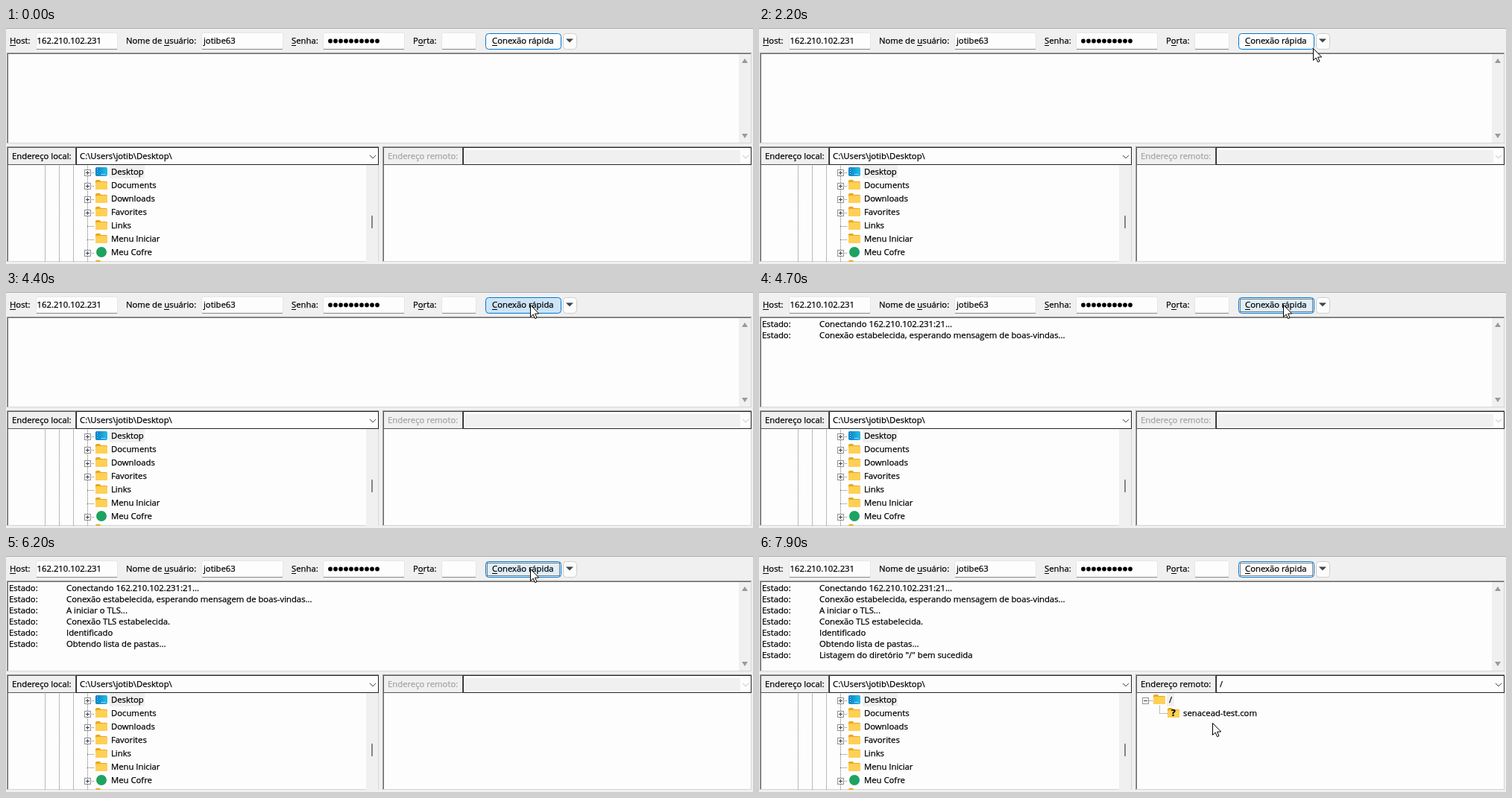
Recreate the animation shown at these times as an HTML page with a canvas. Size 1002 px wide and 317 px high, loop 8 s.

```html
<!DOCTYPE html>
<html lang="pt">
<head>
<meta charset="utf-8">
<style>
html, body { margin: 0; width: 1002px; height: 317px; overflow: hidden; }
canvas { display: block; }
</style>
</head>
<body>
<canvas id="stage" width="1002" height="317"></canvas>
<script>
const ctx = document.getElementById('stage').getContext('2d', { alpha: false });
const LOOP = 8000;
const FACE = '#f0f0f0', PAPER = '#fdfdfd', DARK = '#555', INK = '#000', BLUE = '#0078d4';

// [time, x, y]; an entry without a place hides the pointer
const pointer = [
  [0], [200, 34, 16], [300, 28, 9], [400, 22, -6], [500],
  [2200, 743, 27], [2300, 732, 21], [2400, 723, 17],
  [2600, 720, 17], [2700, 715, 17], [2800, 710, 17], [2900, 706, 17], [3000, 703, 17],
  [7200, 688, 34], [7300], [7600, 625, 154], [7800, 615, 195], [7900, 608, 224]
];

const log = [
  [4600, 'Conectando 162.210.102.231:21...'],
  [4700, 'Conexão estabelecida, esperando mensagem de boas-vindas...'],
  [5000, 'A iniciar o TLS...'],
  [5300, 'Conexão TLS estabelecida.'],
  [6200, 'Identificado'],
  [6200, 'Obtendo lista de pastas...'],
  [6300, 'Listagem do diretório "/" bem sucedida']
];

const localTree = ['Desktop', 'Documents', 'Downloads', 'Favorites', 'Links', 'Menu Iniciar', 'Meu Cofre', ''];

function rect(x, y, w, h, color) {
  ctx.fillStyle = color;
  ctx.fillRect(x, y, w, h);
}

function frame(x, y, w, h, color) {
  ctx.strokeStyle = color;
  ctx.strokeRect(x + .5, y + .5, w - 1, h - 1);
}

function rounded(x, y, w, h, r, fill, stroke) {
  ctx.beginPath();
  ctx.roundRect(x + .5, y + .5, w - 1, h - 1, r);
  ctx.fillStyle = fill;
  ctx.fill();
  ctx.strokeStyle = stroke || fill;
  ctx.stroke();
}

function polygon(points, fill, stroke) {
  ctx.beginPath();
  points.forEach(([x, y]) => ctx.lineTo(x, y));
  ctx.closePath();
  ctx.fillStyle = fill;
  ctx.fill();
  if (stroke) {
    ctx.strokeStyle = stroke;
    ctx.stroke();
  }
}

function disc(x, y, r, color) {
  ctx.fillStyle = color;
  ctx.beginPath();
  ctx.arc(x, y, r, 0, 7);
  ctx.fill();
}

// A hairline stroke gives the type its slightly heavier weight
function text(s, x, y, color = INK) {
  ctx.fillStyle = ctx.strokeStyle = color;
  ctx.fillText(s, x, y);
  ctx.lineWidth = .25;
  ctx.strokeText(s, x, y);
  ctx.lineWidth = 1;
}

// Label with one underlined access key
function keyLabel(s, key, x, y) {
  text(s, x, y);
  const start = x + ctx.measureText(s.slice(0, key)).width;
  rect(Math.round(start), y + 2, Math.round(ctx.measureText(s[key]).width), 1, INK);
}

function dots(x1, y1, x2, y2) {
  const n = Math.max(x2 - x1, y2 - y1);
  for (let i = 0; i <= n; i += 2) {
    rect(x1 + (x2 > x1 ? i : 0), y1 + (y2 > y1 ? i : 0), 1, 1, '#777');
  }
}

function chevron(x, y, color) {
  ctx.strokeStyle = color;
  ctx.beginPath();
  ctx.moveTo(x - 4, y - 2);
  ctx.lineTo(x, y + 2);
  ctx.lineTo(x + 4, y - 2);
  ctx.stroke();
}

function field(x, w) {
  rounded(x, 6, w, 23, 2, PAPER, '#e6e6e6');
  rect(x + 1, 28, w - 2, 1, '#888');
}

function expander(x, y, open) {
  rect(x - 4, y - 4, 9, 9, '#fff');
  frame(x - 4, y - 4, 9, 9, '#919191');
  rect(x - 2, y, 5, 1, '#345');
  if (!open) rect(x, y - 2, 1, 5, '#345');
}

function folder(x, y) {
  rounded(x, y - 7, 7, 6, 1, '#e9a820');
  rounded(x, y - 5, 16, 11, 1, '#e9a820');
  rounded(x, y - 4, 16, 10, 1, '#ffd055');
}

function desktopIcon(x, y) {
  const sky = ctx.createLinearGradient(x, y, x + 16, y);
  sky.addColorStop(0, '#0a7fc4');
  sky.addColorStop(1, '#28bce8');
  rounded(x, y - 6, 16, 12, 1, sky);
  for (let i = 0; i < 3; i++) {
    rect(x + 2, y - 4 + i * 3, 1, 1, '#9fdcf5');
    rect(x + 8 + i * 2, y + 3, 1, 1, '#fff');
  }
}

function toolbar(t) {
  [[40, 110], [262, 110], [425, 110], [584, 47]].forEach(f => field(...f));
  keyLabel('Host:', 0, 5, 21);
  keyLabel('Nome de usuário:', 8, 161, 21);
  keyLabel('Senha:', 0, 383, 21);
  keyLabel('Porta:', 1, 546, 21);
  text('162.210.102.231', 41.5, 21);
  text('jotibe63', 265, 21);
  for (let i = 0; i < 10; i++) disc(435 + i * 7, 17.5, 2.9, INK);

  const hover = t >= 2300 && t < 7300;
  const pressed = t >= 4400 && t < 4500;
  rounded(643, 7, 102, 22, 4, pressed ? '#cce4f7' : hover ? '#e0eef9' : PAPER, BLUE);
  if (t >= 4500) {
    ctx.setLineDash([1, 1]);
    frame(645, 9, 98, 18, INK);
    ctx.setLineDash([]);
  }
  keyLabel('Conexão rápida', 0, 652, 21);
  rounded(747, 7, 19, 22, 4, PAPER, '#cfcfcf');
  polygon([[751, 14.5], [761, 14.5], [756, 19.5]], '#444');
}

function sunken(x, y, w, h) {
  rect(x, y, w, h, PAPER);
  frame(x, y, w, h, '#d5d5d5');
  rect(x, y, w, 1, '#a0a0a0');
  rect(x, y, 1, h, '#a0a0a0');
  rect(x + 1, y + 1, w - 2, 1, '#696969');
  rect(x + 1, y + 1, 1, h - 2, '#696969');
}

function logPane(t) {
  sunken(1, 33, 999, 122);
  rect(983, 35, 16, 119, FACE);
  polygon([[987, 47], [995, 47], [991, 41]], '#999');
  polygon([[987, 142], [995, 142], [991, 148]], '#999');
  log.forEach(([start, message], i) => {
    if (t < start) return;
    text('Estado:', 4, 47 + i * 15);
    text(message, 81, 47 + i * 15);
  });
}

function addressBar(x, labelWidth, w, label, enabled, path, arrow) {
  const combo = x + labelWidth + 1;
  sunken(x, 159, w, 155);
  rect(x + 1, 160, labelWidth, 24, FACE);
  frame(x + 1, 160, labelWidth, 24, DARK);
  frame(combo, 160, w - labelWidth - 1, 24, '#222');
  if (!enabled) rect(combo + 3, 164, w - labelWidth - 19, 17, FACE);
  text(label, x + 7, 176, enabled ? INK : '#a3a3a3');
  text(path, combo + 5, 176);
  chevron(x + w - 8, 173, arrow);
}

function localPane() {
  addressBar(1, 92, 499, 'Endereço local:', true, 'C:\\Users\\jotib\\Desktop\\', '#444');
  ctx.save();
  ctx.beginPath();
  ctx.rect(3, 184, 496, 130);
  ctx.clip();
  [52, 71, 90, 109].forEach(x => dots(x, 185, x, 313));
  rect(139, 184, 47, 18, FACE);
  localTree.forEach((name, i) => {
    const y = 193 + i * 18;
    dots(109, y + 1, 118, y + 1);
    if (![4, 5].includes(i)) expander(109, y + 1);
    if (i === 0) desktopIcon(120, y);
    else if (i === 6) disc(128, y, 7, '#1ea362');
    else folder(120, y);
    text(name, 141, y + 4);
  });
  rect(483, 184, 16, 130, FACE);
  rect(490, 252, 2, 17, '#868686');
  ctx.restore();
}

function remotePane(t) {
  const enabled = t >= 6400;
  addressBar(505, 107, 495, 'Endereço remoto:', enabled, enabled ? '/' : '', t >= 6700 ? '#444' : '#c4c4c4');
  if (t < 6500) return;
  rect(547, 184, 10, 18, FACE);
  dots(523, 194, 528, 194);
  expander(518, 194, true);
  folder(529, 193);
  text('/', 550, 197);
  dots(537, 201, 537, 211);
  dots(537, 211, 547, 211);
  folder(548, 211);
  ctx.save();
  ctx.font = 'bold 12px "Open Sans", sans-serif';
  text('?', 553, 215);
  ctx.restore();
  text('senacead-test.com', 569, 215);
}

function drawPointer(t) {
  const [, x, y] = pointer.findLast(p => p[0] <= t);
  if (x === undefined) return;
  const shape = [[0, 0], [0, 16], [3.7, 12.6], [6.1, 18.2], [8.5, 17.2], [6.1, 11.7], [11.2, 11.5]];
  polygon(shape.map(([dx, dy]) => [x + .5 + dx, y + .5 + dy]), '#fff', INK);
}

function draw(t) {
  ctx.font = '11.3px "Open Sans", sans-serif';
  ctx.lineWidth = 1;
  rect(0, 0, 1002, 317, FACE);
  rect(0, 0, 1002, 1, '#a8a8a8');
  toolbar(t);
  logPane(t);
  localPane();
  remotePane(t);
  drawPointer(t);
}

function tick() {
  draw(performance.now() % LOOP);
  requestAnimationFrame(tick);
}
tick();
</script>
</body>
</html>
```
